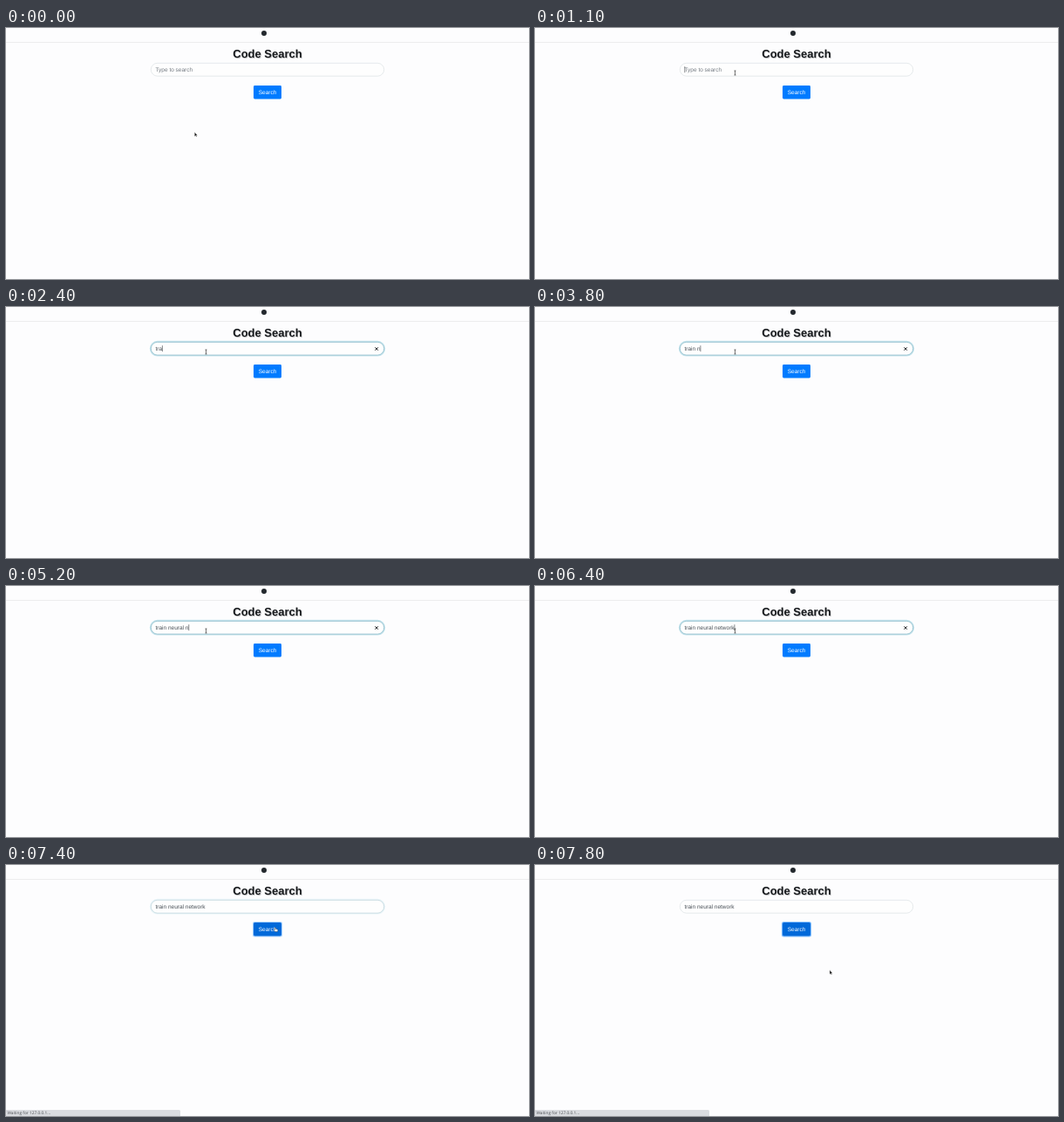
Animation, 600 px wide and 288 px high, one loop 8 s. Source, as an HTML page:

```html
<!DOCTYPE html>
<html lang="en">
<head>
<meta charset="utf-8">
<title>Code Search</title>
<style>
  html, body { margin: 0; width: 100%; height: 100%; overflow: hidden; background: #fdfdfe; }
  svg { display: block; width: 600px; height: 288px; }
  text { font: 6.5px "Liberation Sans", Arial, sans-serif; white-space: pre; text-rendering: geometricPrecision; }
  .title { font-size: 13px; font-weight: bold; text-anchor: middle; }
  .status { font: 500 4.8px "Open Sans", sans-serif; }
</style>
</head>
<body>
<svg viewBox="0 0 600 288">
  <rect width="600" height="288" fill="#fdfdfe"/>
  <circle cx="296" cy="6" r="3" fill="#24292e"/>
  <path d="M0 16.5H600" stroke="#ececee"/>

  <text class="title" x="300.7" y="34.9" fill="#c4c4c6">Code Search</text>
  <text class="title" x="300" y="34.2" fill="#16191c">Code Search</text>

  <rect id="glow" x="165.6" y="39.6" width="268.8" height="16.2" rx="8.1" fill="none" stroke="#c3e3ec" stroke-width="1.6"/>
  <rect x="166.3" y="40.3" width="267.4" height="14.9" rx="7.45" fill="#fefefe" stroke="#d6dcdf" stroke-width=".6"/>
  <rect id="border" x="166.3" y="40.3" width="267.4" height="14.9" rx="7.45" fill="none" stroke="#83bccd" stroke-width=".7"/>
  <text id="placeholder" x="171.5" y="50" fill="#747b82">Type to search</text>
  <text id="query" x="171.5" y="50" fill="#495057"></text>
  <path id="caret" d="M0 44.2V51.2" stroke="#33383d" stroke-width=".6"/>
  <path id="clear" d="M423.5 46.3l3.4 3.4m0-3.4l-3.4 3.4" stroke="#16191c" stroke-width="1"/>

  <rect id="ring" x="283.5" y="65.5" width="33" height="16.4" rx="1.9" fill="none" stroke="#80bdff" stroke-width="1.2"/>
  <rect id="button" x="284" y="66" width="32" height="15.4" rx="1.4"/>
  <text x="300" y="75.9" text-anchor="middle" fill="#fff">Search</text>

  <g id="status">
    <path d="M0 281H198.5Q200 281 200 282.5V288H0Z" fill="#dadce0"/>
    <text class="status" x="1.4" y="286.3" fill="#4a4d51">Waiting for 127.0.0.1...</text>
  </g>

  <path id="arrow" d="M0 0V4.9L1.2 3.9L1.9 5.5L2.7 5.1L2 3.6H3.4Z" fill="#111" stroke="#fff" stroke-width=".4"/>
  <path id="beam" d="M-1-2.5H1M0-2.5V2.5M-1 2.5H1" fill="none" stroke="#3a3a3a" stroke-width=".7"/>
  <path id="hand" d="M-.6 0Q0-.5.5 0V1.5L2.5 1.9Q3 2 2.9 2.7L2.4 4.5H-.2L-1.7 2.6Q-1.5 1.9-.6 2.6Z" fill="#fff" stroke="#222" stroke-width=".35"/>
</svg>
<script>
const LOOP = 8000, STEP = 100;
const FOCUS = 1000, CLICK = 7300, LOADING = 7400;
const PHRASE = "train neural network";
const KEY_TIMES = [1900, 2200, 2400, 2500, 2600, 2900, 3800, 4000, 4100, 4300,
                   4500, 4600, 4800, 5100, 5300, 5400, 5600, 5800, 6000, 6200];
// Pointer moves: start, end, from, to
const MOVES = [
  [0, 900, [216.3, 119.6], [229.5, 51.5]],
  [6600, 7150, [229.5, 51.5], [309, 72]],
  [7480, 7800, [309, 72], [338, 120.6]]
];

const el = {};
document.querySelectorAll("[id]").forEach(node => el[node.id] = node);

const clamp = v => Math.max(0, Math.min(1, v));
const ramp = (t, start, length) => clamp((t - start) / length);
const ease = u => u * u * (3 - 2 * u);
const show = (node, on) => node.setAttribute("visibility", on ? "visible" : "hidden");
const inside = (x, y, left, top, right, bottom) => x >= left && x <= right && y >= top && y <= bottom;

function pointerAt(t) {
  const [start, end, from, to] = MOVES.filter(m => m[0] <= t).pop();
  const u = ease(ramp(t, start, end - start));
  return from.map((v, i) => v + (to[i] - v) * u);
}

function drawPointer(t) {
  const [x, y] = pointerAt(t);
  const overInput = inside(x, y, 166, 40, 434, 55.5);
  const overButton = inside(x, y, 284, 66, 316, 81.4);
  const kind = overInput ? "beam" : overButton ? "hand" : "arrow";
  for (const name of ["arrow", "beam", "hand"]) show(el[name], name === kind);
  el[kind].setAttribute("transform", `translate(${x} ${y})`);
  return overButton;
}

function drawInput(t) {
  const typed = KEY_TIMES.filter(k => k <= t).length;
  const focused = t >= FOCUS && t < CLICK;
  const lastAction = typed ? KEY_TIMES[typed - 1] : FOCUS;
  el.query.textContent = PHRASE.slice(0, typed);
  const width = typed ? el.query.getComputedTextLength() : 0;
  el.caret.setAttribute("transform", `translate(${171.8 + width} 0)`);
  show(el.caret, focused && t - lastAction < 500);
  show(el.placeholder, !typed);
  show(el.clear, focused && typed);
  const glow = ramp(t, FOCUS + 100, 150) - ramp(t, CLICK, 150);
  el.glow.setAttribute("opacity", glow);
  el.border.setAttribute("opacity", glow);
}

function draw(time) {
  const t = Math.floor(time % LOOP / STEP) * STEP;
  const hovered = drawPointer(t);
  drawInput(t);
  el.button.setAttribute("fill", hovered || t >= CLICK ? "#0069d9" : "#007bff");
  el.ring.setAttribute("opacity", ramp(t, CLICK, 150));
  show(el.status, t >= LOADING);
}

let origin;
function tick(now) {
  origin ??= now;
  draw(now - origin);
  requestAnimationFrame(tick);
}
draw(0);
requestAnimationFrame(tick);
</script>
</body>
</html>
```
